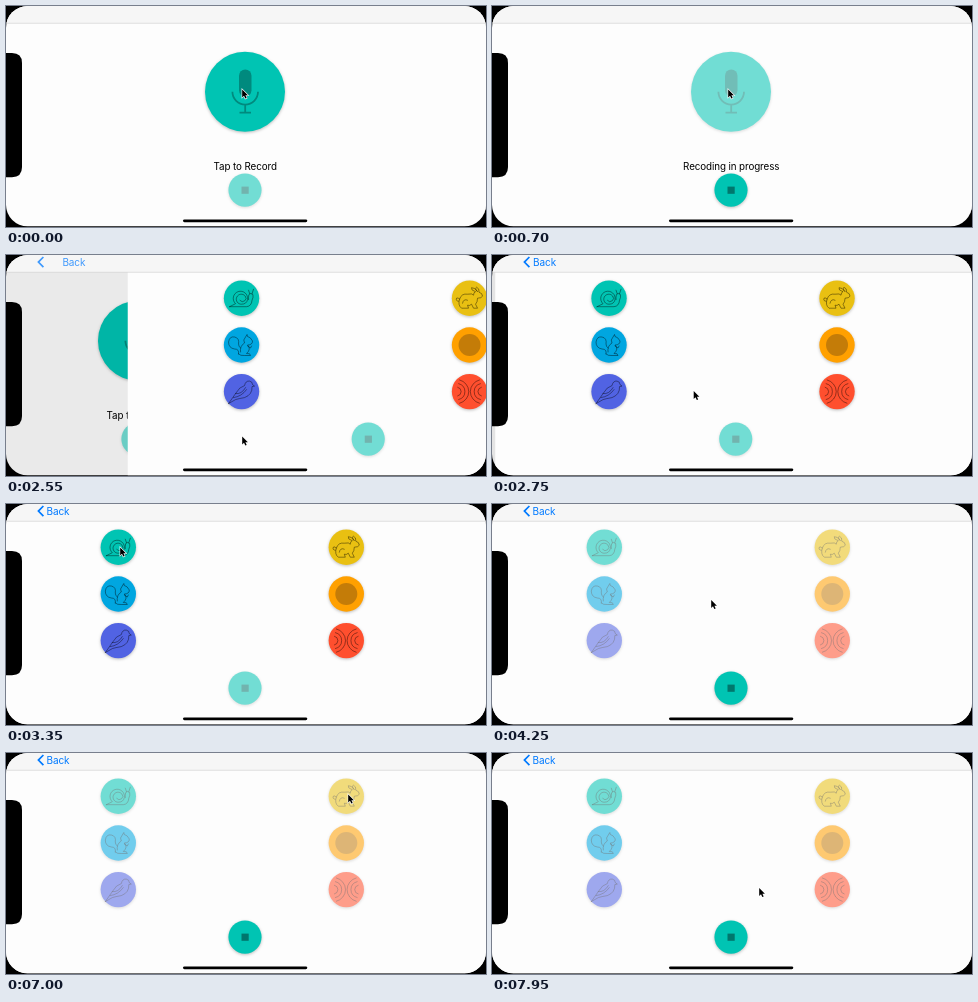
An HTML page that plays this animation: 480 by 221 pixels, repeating every 8 s.

```html
<!DOCTYPE html>
<html lang="en">
<head>
<meta charset="utf-8">
<title>Voice recorder</title>
<style>
  html, body { margin: 0; width: 100%; height: 100%; overflow: hidden; background: #000; }
  svg { display: block; width: 100%; height: 100%; }
  text { font: 9.8px Inter, "Liberation Sans", sans-serif; letter-spacing: -.1px; }
  #nav text { font-size: 10px; }
  .disc { filter: drop-shadow(0 1.8px 1.5px rgba(0, 0, 0, .25)); }
  .line { fill: none; stroke: #000; stroke-opacity: .52; stroke-width: .8;
          stroke-linecap: round; stroke-linejoin: round; }
</style>
</head>
<body>
<svg viewBox="0 0 480 221">
  <defs>
    <clipPath id="screen"><rect width="480" height="220.3" rx="21.5"/></clipPath>
  </defs>
  <rect width="480" height="221"/>
  <g clip-path="url(#screen)">
    <rect width="480" height="221" fill="#fdfdfd"/>
    <g id="record">
      <g id="mic" transform="translate(239 85.8)">
        <circle class="disc" r="40" fill="#00c4b3"/>
        <rect x="-6" y="-22.3" width="12.5" height="27" rx="6.2" fill="#008a7e"/>
        <path d="M-12.6 0a12.8 12.8 0 0 0 25.6 0M.2 13V20.9M-5.5 20.9H6" fill="none" stroke="#008a7e" stroke-width="1.8"/>
      </g>
      <text id="label" x="239.2" y="163.9" text-anchor="middle"></text>
      <g id="stopRecord" transform="translate(239 184.1)"></g>
    </g>
    <rect id="shade" y="17" width="480" height="204"/>
    <g id="play">
      <rect x="-1.5" y="17" width="482" height="204" fill="#fdfdfd"/>
      <g id="effects"></g>
      <g id="stopPlay" transform="translate(239 184.1)"></g>
    </g>
    <rect width="480" height="17" fill="#f6f6f6"/>
    <rect y="16.8" width="480" height=".8" fill="#d8d8d8"/>
    <g id="nav" fill="#007aff">
      <path d="M37.4 2L32.4 7.1L37.4 12.2" fill="none" stroke="#007aff" stroke-width="1.7"/>
      <text id="back" y="10.8">Back</text>
    </g>
  </g>
  <path d="M0 47H6Q16 47 16 57V161Q16 171.2 6 171.2H0Z"/>
  <rect x="177" y="213.4" width="124.3" height="2.9" rx="1.45"/>
  <path id="cursor" d="M.2 .4V8.4L2 6.8L3.3 9.6L4.7 9L3.4 6.2H5.9Z" stroke="#fff" stroke-width="1.2" paint-order="stroke"/>
</svg>
<script>
const LOOP = 8000, STEP = 50;
const $ = id => document.getElementById(id);

// Nested arcs facing each other for the echo button
const echo = [4.5, 8.2, 12].map(r => [-1, 1].map(s => {
  const x = s * (13 - r * .26), y = r * .97;
  return `M${x} ${-y}A${r} ${r} 0 0 ${s < 0 ? 1 : 0} ${x} ${y}`;
}).join('')).join('');

const icons = {
  snail: 'M-12 8.5Q-8 6.5-6 5.5A7.2 7.2 0 1 1 6 1.5Q5 6 0 6A5 5 0 1 1 3.6-2.2A3.4 3.4 0 1 1-1.6 2.2' +
    'M-12 8.5H5Q10 8 10.5 2Q12-1 11.4-3.6Q9-6 7.3-3.5Q6.8-1 7 1.5M10.5-4.5L12-9M8.2-4.5L7-8',
  squirrel: 'M-3 9Q-2 4-7 4Q-13 3-13-3Q-12-9-7-8Q-2-7-3-1Q-3 2-1 3' +
    'M-3 9Q-1 11 3 10.5H9Q9 8 5 8.5Q10 4 6 0Q11 0 11-4Q9-8 6-8.5L5.5-10.5L4-8Q1-5 3-2Q-2 1-1 7M6 1L9 3L10 1',
  bird: 'M-13 12L-6 2Q-2-5 3-6Q4-11 8-10.5Q11-10 11-7L13-5.5L10.5-5Q11 3 3 6Q-3 7-6 8L-13 12' +
    'M-6 2Q0 3 4-4M-8 6Q0 5 5-2',
  rabbit: 'M-11 3Q-14 3-13 0Q-11-1-10 1Q-8-5-2-4Q3-5 4-3Q4-6 6-6.5Q1-8 2-10.5Q5-11 8-6.5' +
    'Q5-10 7-11Q10-10 9.5-6Q13-5 13-2Q12 0 8 0Q8 4 6 6L8 10H4L2 6Q0 8-2 7L-1 10H-8Q-12 7-10 1M-7 5Q-6 0-2 2',
  echo
};

const buttons = [
  ['snail', 112.3, 43.2, '#00c4b3'], ['squirrel', 112.3, 90, '#00a6e0'], ['bird', 112.3, 136.6, '#5163e3'],
  ['rabbit', 340.3, 43.2, '#e9c012'], ['plain', 340.3, 90, '#ffa000'], ['echo', 340.3, 136.6, '#ff4f2e']
];

$('effects').innerHTML = buttons.map(([name, x, y, fill]) =>
  `<g transform="translate(${x} ${y})"><circle class="disc" r="17.7" fill="${fill}"/>` +
  (icons[name] ? `<path class="line" d="${icons[name]}"/>` : '<circle r="11" fill="#c47c08"/>') +
  '</g>').join('');

for (const id of ['stopRecord', 'stopPlay'])
  $(id).innerHTML = '<circle class="disc" r="16.6" fill="#00c4b3"/>' +
    '<rect x="-3.5" y="-3.5" width="7.2" height="7.2" fill="#00776d"/>';

const ease = {
  in: u => u ** 1.5,
  out: u => 1 - (1 - u) ** 2,
  both: u => u * u * (3 - 2 * u),
  even: u => u
};

// Pointer stops: time, x, y, easing on the way there
const path = [
  [0, 236, 83], [800, 236, 83], [1600, 259, 174.5, 'both'], [1650, 259, 174.5],
  [1700, 250, 175.5, 'even'], [1850, 236, 181, 'out'], [2550, 236, 181],
  [2750, 201.5, 135.5, 'in'], [3150, 114, 43, 'out'], [3750, 114, 43],
  [4250, 219, 95.5, 'both'], [4850, 219, 95.5], [5600, 358.5, 48, 'both'],
  [5700, 356, 47.2, 'even'], [5800, 355, 46.5, 'out'], [5950, 355, 46.5],
  [6500, 342, 41, 'both'], [7500, 342, 41], [7800, 297, 99, 'in'],
  [7950, 267, 134.5, 'out'], [LOOP, 267, 134.5]
];

function pointer(t) {
  const i = path.findIndex(p => p[0] > t);
  const [t0, x0, y0] = path[i - 1], [t1, x1, y1, kind = 'even'] = path[i];
  const u = ease[kind]((t - t0) / (t1 - t0));
  return [x0 + (x1 - x0) * u, y0 + (y1 - y0) * u];
}

// Critically damped spring: the share of the push still to go
function remaining(t) {
  const w = Math.max(0, t - 2417.2) * .02;
  return w > 12 ? 0 : (1 + w) * Math.exp(-w);
}

const move = (id, x, y = 0) => $(id).setAttribute('transform', `translate(${x} ${y})`);
const enable = (el, on) => el.setAttribute('opacity', on ? 1 : .55);

function draw(t) {
  const recording = t >= 400 && t < 2200;
  const playing = t >= 3700 && t < 7050 || t >= 7450;
  const rest = remaining(t), done = 1 - rest;

  enable($('mic'), !recording);
  enable($('stopRecord'), recording);
  $('label').textContent = recording ? 'Recoding in progress' : 'Tap to Record';
  for (const button of $('effects').children) enable(button, !playing);
  enable($('stopPlay'), playing);

  move('record', -144 * done);
  move('play', 480 * rest);
  $('shade').setAttribute('opacity', .1 * done);
  $('nav').setAttribute('opacity', done);
  $('back').setAttribute('x', 40.5 + 62 * rest);
  move('cursor', ...pointer(t));
}

const start = performance.now();
function tick() {
  const t = (performance.now() - start) % LOOP;
  draw(Math.floor(t / STEP) * STEP);
  requestAnimationFrame(tick);
}
tick();
</script>
</body>
</html>
```
